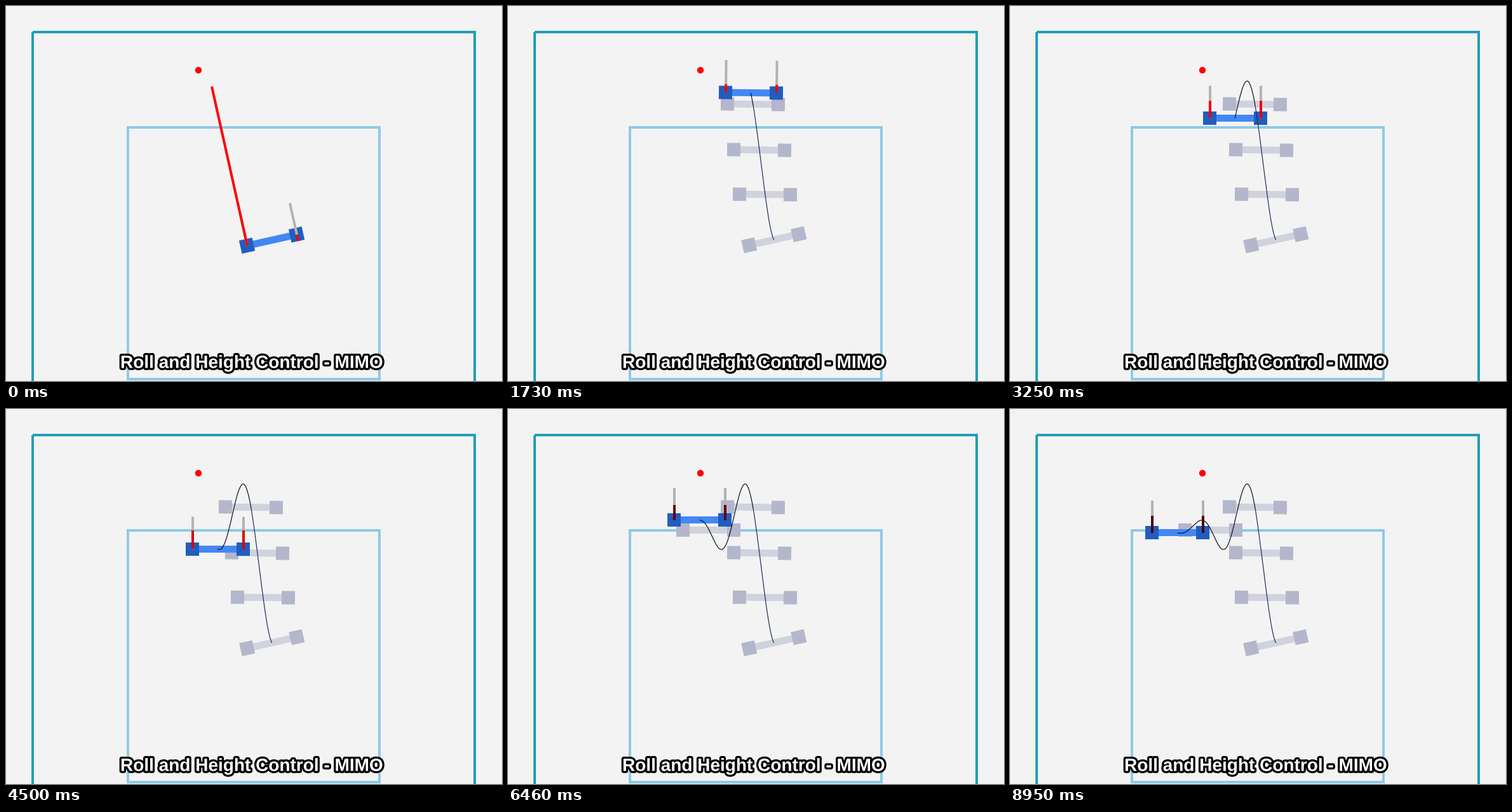
Animation of 781 by 590 pixels, one loop 9.02 s. Source, as a matplotlib script:

```python
import numpy as np
import matplotlib.pyplot as plt
from matplotlib.animation import FuncAnimation
from matplotlib.patches import Circle, Polygon, Rectangle
from matplotlib.patheffects import withStroke

W, H, DPI = 781, 590, 128
PX = 72 / DPI
LOOP, TICK = 9020, 20

# Playback time (ms) at which some simulation steps appear
STEP_AT = [0, 13, 27, 41, 54, 68, 82, 96, 110, 124, 130, 131]
TIME_AT = [0, 930, 1870, 2830, 3740, 4700, 5650, 6600, 7570, 8530, 8950, 9020]

# Horizontal drift
X_STEP = [0, 13, 27, 41, 54, 68, 82, 96, 110, 124, 130]
X_POS = [418.8, 398.6, 379.6, 361.6, 345.6, 329.8, 314.8, 299.7, 284.6, 269.7, 263.5]
DRIFT = np.polyfit(X_STEP, X_POS, 5)

# Height: climb knots (step, y, speed), then a damped oscillation
CLIMB = [(0, 368, -3), (13, 250, -11.3), (25, 136.5, -5.5), (31.5, 118, 0)]
REST, SWING, PEAK = 189.2, 71.2, 31.5
FREQ, DAMP = 0.10085, 0.02585

# Step of appearance and centre of each afterimage
GHOSTS = [(0, 418.75, 367.75), (9, 404.5, 296.5), (15, 395.5, 226.5),
          (22.3, 385.5, 154.5), (81.5, 315.5, 190.5)]


def height(k):
    if k >= PEAK:
        s = k - PEAK
        wave = np.cos(FREQ * s) + DAMP / FREQ * np.sin(FREQ * s)
        return REST - SWING * np.exp(-DAMP * s) * wave
    for (k0, y0, v0), (k1, y1, v1) in zip(CLIMB, CLIMB[1:]):
        if k < k1:
            h = k1 - k0
            t = (k - k0) / h
            ease = t * t * (3 - 2 * t)
            return (y0 + (y1 - y0) * ease + v0 * h * t * (1 - t) ** 2
                    - v1 * h * t * t * (1 - t))


def roll(k):
    settle = 12.6 * (1 + 0.7 * k) * np.exp(-0.7 * k)
    sag = 0.8 * (1 - np.exp(-k / 4)) * np.exp(-(k / 38) ** 4)
    return np.radians(settle - sag)


STEPS = np.arange(0, 130.01, 0.25)
PATH_X = np.polyval(DRIFT, STEPS)
PATH_Y = np.array([height(k) for k in STEPS])
SPEED = np.gradient(PATH_Y, STEPS)


def thrust(k):
    y, v = height(k), np.interp(k, STEPS, SPEED)
    lift = 25.5 + 0.157 * (y - REST) + 0.75 * v + 72 * np.exp(-k)
    turn = 133.5 * (1 - 0.7 * k) * np.exp(-0.7 * k)
    return lift + turn, lift - turn


def axes_of(angle):
    along = np.array([np.cos(angle), -np.sin(angle)])
    up = np.array([-np.sin(angle), -np.cos(angle)])
    return along, up


def box(center, angle, half_w, half_h):
    along, up = axes_of(angle)
    a, u = along * half_w, up * half_h
    return np.array([center - a - u, center + a - u, center + a + u, center - a + u])


fig = plt.figure(figsize=(W / DPI, H / DPI), dpi=DPI, facecolor="#f3f3f3")
ax = fig.add_axes([0, 0, 1, 1])
ax.set(xlim=(0, W), ylim=(H, 0))
ax.axis("off")


def frame_rect(x, y, w, h, color):
    ax.add_patch(Rectangle((x, y), w, h, fill=False, ec=color, lw=4 * PX,
                           joinstyle="miter", zorder=1))


def stroke(color, width, z):
    return ax.plot([], [], color=color, lw=width * PX, solid_capstyle="butt", zorder=z)[0]


class Craft:
    """A beam with a square rotor block at each end."""

    def __init__(self, beam, block, z):
        self.beam = ax.add_patch(Polygon(np.zeros((4, 2)), fc=beam, lw=0, zorder=z))
        self.blocks = [ax.add_patch(Polygon(np.zeros((4, 2)), fc=block, lw=0, zorder=z + 0.1))
                       for _ in range(2)]

    def place(self, center, angle):
        along, _ = axes_of(angle)
        ends = [center - 40 * along, center + 40 * along]
        self.beam.set_xy(box(center, angle, 40, 5.5))
        for block, end in zip(self.blocks, ends):
            block.set_xy(box(end, angle, 10.5, 10.5))
        return ends

    def show(self, on):
        for part in (self.beam, *self.blocks):
            part.set_visible(on)


frame_rect(42, 41, 696, 696, "#219ebc")
frame_rect(192, 191, 396, 396, "#8ecae6")
ax.add_patch(Circle((303, 101), 5.2, fc="red", lw=0, zorder=2))
ax.text(387, 569.5, "Roll and Height Control - MIMO", family="Liberation Sans",
        weight="bold", size=28 * PX, color="white", ha="center", va="baseline",
        zorder=20, path_effects=[withStroke(linewidth=6.5 * PX, foreground="black")])

ghosts = []
for i, (born, gx, gy) in enumerate(GHOSTS):
    ghost = Craft("#d0d2de", "#b4b6cb", 3 + 0.2 * i)
    ghost.place(np.array([gx, gy]), roll(born))
    ghosts.append((born, ghost))

craft = Craft("#4287f5", "#215dc0", 6)
trails = [(0, 22, stroke("#1b2f5c", 1.2, 8)), (22, 130, stroke("#0a1020", 1.2, 8))]
limits = [stroke("#b3b3b3", 4, 9) for _ in range(2)]
jets = [stroke("red", 4, 10) for _ in range(2)]


def update(i):
    t = i * TICK + TICK / 2
    k = min(int(np.interp(t, TIME_AT, STEP_AT) + 0.15), 130)

    center = np.floor([np.polyval(DRIFT, k), height(k)]) + 0.5
    angle = roll(k)
    _, up = axes_of(angle)
    ends = craft.place(center, angle)

    shade = np.interp(k, [0, 47, 65, 94, 130], [1, 0.95, 0.85, 0.4, 0.3])
    for end, limit, jet, force in zip(ends, limits, jets, thrust(k)):
        base = end + [0.5, 0]
        limit.set_data(*np.array([base, base + 51 * up]).T)
        jet.set_data(*np.array([base, base + force * up]).T)
        jet.set_color((shade, 0, 0))

    for start, stop, line in trails:
        on = (STEPS >= start) & (STEPS <= min(k, stop))
        line.set_data(PATH_X[on], PATH_Y[on])
    for born, ghost in ghosts:
        ghost.show(k >= born)
    return []


anim = FuncAnimation(fig, update, frames=LOOP // TICK, interval=TICK,
                     init_func=lambda: update(0), repeat=True, repeat_delay=0)
plt.show()
```
